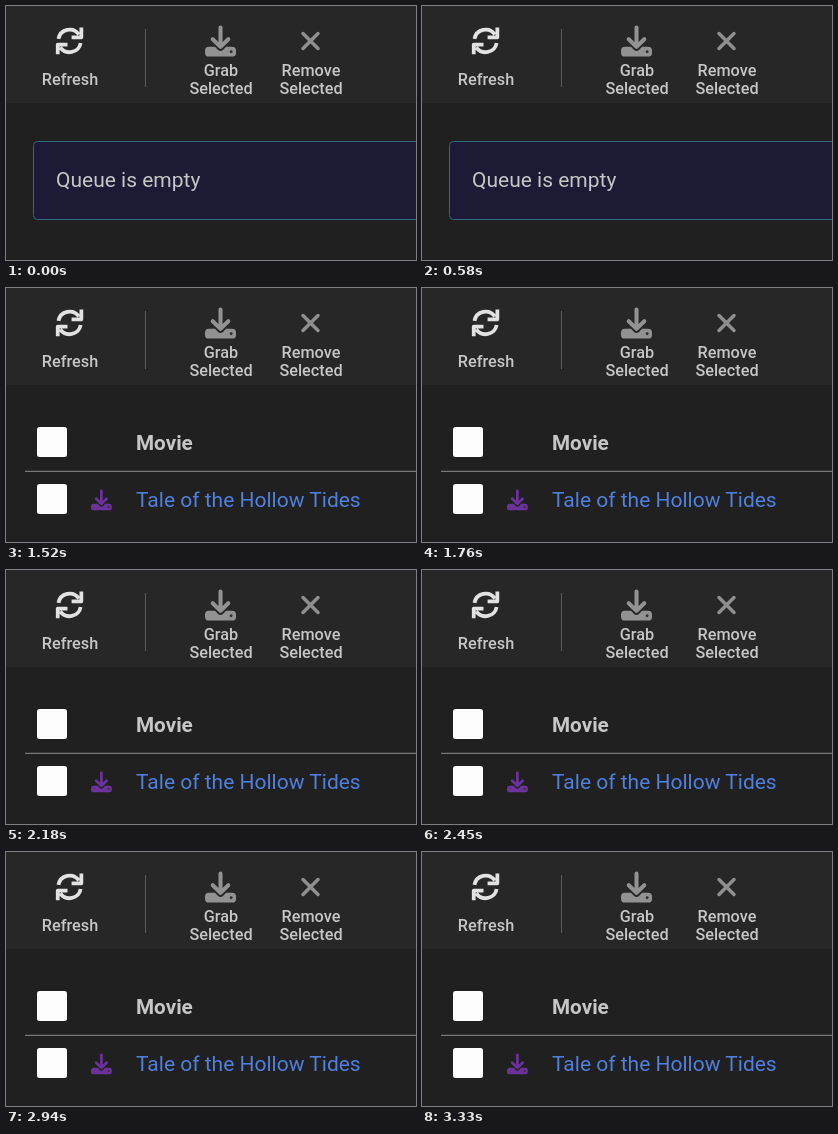
Animation of 410x254 px, one loop 5.03 s. Source, as an HTML page:

```html
<!DOCTYPE html>
<html lang="en">
<head>
<meta charset="utf-8">
<title>Movie queue</title>
<style>
  html, body { margin: 0; width: 100%; height: 100%; overflow: hidden; background: #202020; }
  svg { display: block; width: 100%; height: 100%; }
  text { font-family: Roboto, sans-serif; font-size: 21px; fill: #c6c6c6; }
  .label text { font-size: 16.25px; font-weight: 500; text-anchor: middle; }
  .line { fill: none; stroke-linecap: round; stroke-linejoin: round; }
</style>
</head>
<body>
<svg viewBox="0 0 410 254">
  <defs>
    <g id="download">
      <path class="line" stroke="currentColor" stroke-width="4.2" d="M16 2V20M8 14.2L16 22L24 14.2"/>
      <path fill="currentColor" d="M4 22H10.3L13.2 25A4 4 0 0 0 18.8 25L21.7 22H28A4 4 0 0 1 32 26V28A4 4 0 0 1 28 32H4A4 4 0 0 1 0 28V26A4 4 0 0 1 4 22Z"/>
      <circle cx="27" cy="27" r="1.5" fill="#303030"/>
    </g>
    <path id="turn" d="M49 218A212 212 0 0 1 430 136M476 6V188H294"/>
  </defs>

  <rect width="410" height="254" fill="#202020"/>
  <rect width="410" height="97" fill="#272727"/>

  <g fill="none" stroke="#e2e2e2" stroke-width="70" stroke-linejoin="round" transform="translate(49.8 21.2) scale(.0537)">
    <use href="#turn"/>
    <use href="#turn" transform="rotate(180 256 256)"/>
  </g>
  <path d="M139.5 23V81" stroke="#5a5a5a"/>
  <use href="#download" color="#929292" transform="translate(199 19.5) scale(.97)"/>
  <path class="line" d="M297 27.5L312 42.5M312 27.5L297 42.5" stroke="#8f8f8f" stroke-width="3.5"/>

  <g class="label">
    <text x="64" y="79">Refresh</text>
    <text x="215" y="70">Grab</text>
    <text x="215" y="88">Selected</text>
    <text x="305" y="70">Remove</text>
    <text x="305" y="88">Selected</text>
  </g>

  <g id="empty">
    <rect x="27.5" y="135.5" width="400" height="78" rx="4" fill="#1c1a34" stroke="#316a7a"/>
    <text x="50" y="181">Queue is empty</text>
  </g>

  <g id="list" display="none">
    <rect x="31" y="139" width="30" height="30" rx="2.5" fill="#fdfdfd"/>
    <text x="130" y="162" font-weight="700" style="font-size:20.7px">Movie</text>
    <path d="M19 183.3H410" stroke="#777777" stroke-width="1.2"/>
    <rect x="31" y="196" width="30" height="30" rx="2.5" fill="#fdfdfd"/>
    <use href="#download" color="#6c329c" transform="translate(85 201.5) scale(.65)"/>
    <text x="130" y="219" style="fill:#5080dc">Tale of the Hollow Tides</text>
  </g>
</svg>
<script>
  const LOOP = 5030, FILLED = 1270;
  const empty = document.getElementById('empty');
  const list = document.getElementById('list');
  const show = (el, on) => el.setAttribute('display', on ? 'inline' : 'none');

  function draw(t) {
    const filled = t % LOOP >= FILLED;
    show(empty, !filled);
    show(list, filled);
  }

  const start = performance.now();
  function tick() {
    draw(performance.now() - start);
    requestAnimationFrame(tick);
  }
  tick();
</script>
</body>
</html>
```
